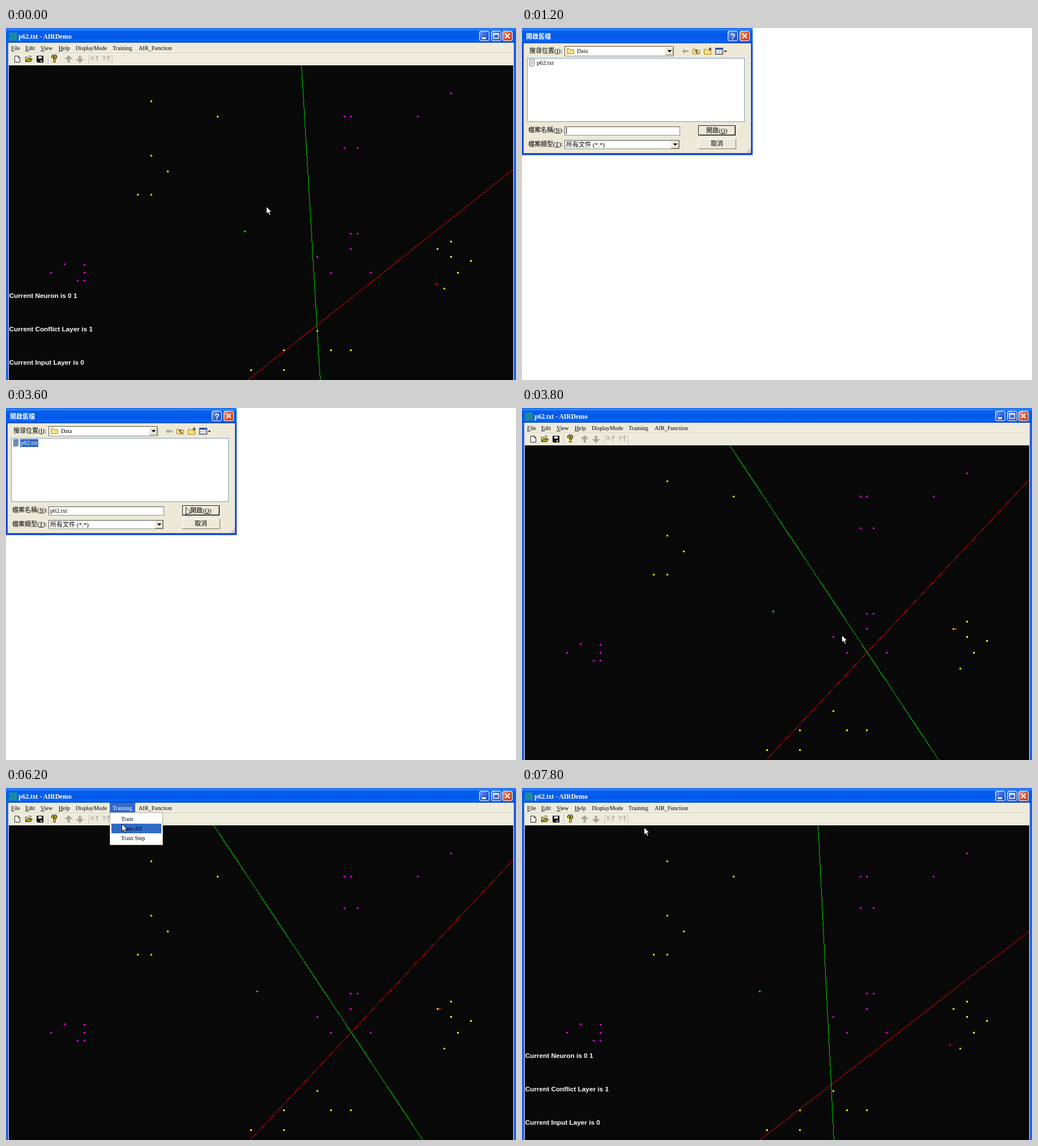
An HTML page that plays this animation: 900 by 622 pixels, repeating every 8000 ms.

```html
<!DOCTYPE html>
<html lang="zh-Hant">
<head>
<meta charset="utf-8">
<title>AIRDemo</title>
<style>
  html, body { margin: 0; width: 100%; height: 100%; overflow: hidden; background: #fff; }
  svg { display: block; }
  text { white-space: pre; }
  .menu { font: 10.2px "Liberation Serif", serif; }
  .file { font: 10.7px "Liberation Serif", serif; }
  .cjk { font: 11px "Liberation Serif", "Noto Sans CJK TC", "Noto Sans CJK", sans-serif; }
  .title { font: bold 11.6px "Liberation Serif", "Noto Sans CJK TC", "Noto Sans CJK", serif; fill: #fff; }
  .status { font: bold 11.8px "Liberation Sans", sans-serif; fill: #fff; }
  .u { text-decoration: underline; }
  .crisp { shape-rendering: crispEdges; }
  .field { fill: #fff; stroke: #8c8b80; }
</style>
</head>
<body>
<svg width="900" height="622" viewBox="0 0 900 622">
  <defs>
    <linearGradient id="bar" x2="0" y2="1">
      <stop offset="0" stop-color="#0a4fd0"/>
      <stop offset=".08" stop-color="#3d92ff"/>
      <stop offset=".2" stop-color="#0660ee"/>
      <stop offset=".6" stop-color="#0257e6"/>
      <stop offset=".88" stop-color="#0566fa"/>
      <stop offset="1" stop-color="#0343bd"/>
    </linearGradient>
    <linearGradient id="blue" x2="1" y2="1">
      <stop offset="0" stop-color="#7ba4f5"/>
      <stop offset=".5" stop-color="#3268e0"/>
      <stop offset="1" stop-color="#1c4cc4"/>
    </linearGradient>
    <linearGradient id="red" x2="1" y2="1">
      <stop offset="0" stop-color="#f3a186"/>
      <stop offset=".5" stop-color="#e2542d"/>
      <stop offset="1" stop-color="#c23c12"/>
    </linearGradient>
    <g id="close">
      <rect x=".5" y=".5" width="17" height="17" rx="2.5" fill="url(#red)" stroke="#fff"/>
      <path d="M5 5l8 8M13 5l-8 8" stroke="#fff" stroke-width="2"/>
    </g>
    <rect id="box" x=".5" y=".5" width="17" height="17" rx="2.5" fill="url(#blue)" stroke="#fff"/>
    <g id="drop" class="crisp">
      <rect width="14" height="14" fill="#ece9d8"/>
      <path d="M0 13.5h13.5V0" fill="none" stroke="#77756a"/>
      <path d="M3 5h8l-4 4z" fill="#000"/>
    </g>
    <path id="folder" d="M.5 10.5v-9h4l1.500 2h6.500v7z" fill="#ffe47c" stroke="#a87e1c"/>
  </defs>

  <g id="app">
    <rect width="900" height="622" fill="#1f60e6"/>
    <rect width="900" height="26" fill="url(#bar)"/>
    <rect x="5" y="8" width="14" height="14" fill="#1a8c96"/>
    <text class="title" x="22" y="19">p62.txt - AIRDemo</text>
    <use href="#box" x="835" y="5"/>
    <path d="M840 18h7" stroke="#fff" stroke-width="3"/>
    <use href="#box" x="856" y="5"/>
    <path d="M860.500 10h9v8.500h-9zM860 11h10" fill="none" stroke="#fff" stroke-width="1.500"/>
    <use href="#close" x="876" y="5"/>

    <rect x="4" y="26" width="892" height="596" fill="#eeebdc"/>
    <g class="crisp" fill="none">
      <path d="M5 44.500h890" stroke="#cbc7b8"/>
      <path d="M74.500 47v17M146.500 47v17M187.500 46v19" stroke="#b9b5a5"/>
      <path d="M5 45.500h890M75.500 47v17M147.500 47v17M188.500 46v19" stroke="#fff"/>
    </g>
    <rect id="hot" x="183" y="26" width="45" height="17" fill="#316ac5"/>
    <g class="menu">
      <text x="9" y="39"><tspan class="u">F</tspan>ile</text>
      <text x="34" y="39"><tspan class="u">E</tspan>dit</text>
      <text x="61" y="39"><tspan class="u">V</tspan>iew</text>
      <text x="93" y="39"><tspan class="u">H</tspan>elp</text>
      <text x="123" y="39">DisplayMode</text>
      <text id="training" x="188" y="39">Training</text>
      <text x="234" y="39">AIR_Function</text>
    </g>

    <path d="M15.500 49.500h6l3 3v8h-9zM21.500 49.500v3h3" fill="#fff" stroke="#222"/>
    <path d="M34.500 59.500v-8h3l1 1.500h5v2M40 50q3-2 5 1" fill="#fff48a" stroke="#222"/>
    <path d="M34.500 59.500l3-4.500h9l-3 4.500z" fill="#b8a414" stroke="#222"/>
    <path d="M54.500 49.500h11v11h-10l-1-1z" fill="#1c1c10" stroke="#000"/>
    <path d="M57 50h6v4h-6zM61 57h2v3h-2z" fill="#eee"/>
    <path d="M82 53v-2q0-2 3-2t3 2q0 2-2.500 3v3M85.500 58v3" fill="none" stroke="#000" stroke-width="4"/>
    <path d="M82 53v-2q0-2 3-2t3 2q0 2-2.500 3v3M85.500 58v3" fill="none" stroke="#e8d000" stroke-width="1.800"/>
    <path d="M110.500 48l7 7h-5v6h-4v-6h-5zM130.500 62l7-7h-5v-6h-4v6h-5z" fill="#aaa79a"/>
    <path d="M149 49l6 8M155 49l-6 8M156 53.500h3M161 59v-9M159 52l2-3 2 3M170 49l3 4 3-4M173 53v5M176 53.500h3M181 59v-9M179 52l2-3 2 3" fill="none" stroke="#aaa79a" stroke-width="1.200"/>

    <rect x="5" y="66" width="890" height="556" fill="#080808"/>
    <g id="dots" class="crisp"></g>
    <g class="crisp" fill="none">
      <path id="red-line" stroke="#c80000"/>
      <path id="green-line" stroke="#00d000"/>
      <rect id="red-dot" width="3" height="3" fill="#f00"/>
      <rect id="green-dot" width="3" height="3" fill="#00f000"/>
    </g>
    <g id="status" class="status">
      <text x="5.500" y="477">Current Neuron is 0 1</text>
      <text x="5.500" y="536">Current Conflict Layer is 1</text>
      <text x="5.500" y="595">Current Input Layer is 0</text>
    </g>
    <g id="popup" class="menu">
      <rect class="crisp" x="183.500" y="43.500" width="93" height="57" fill="#fff" stroke="#aca899"/>
      <rect id="row" x="186" width="88" height="17" fill="#316ac5"/>
      <text x="203" y="58">Train</text>
      <text x="203" y="75">Train All</text>
      <text x="203" y="92">Train Step</text>
    </g>
  </g>

  <g id="dialog">
    <rect width="900" height="622" fill="#fff"/>
    <rect width="407" height="224.500" fill="#0831d9"/>
    <rect x="1" width="405" height="223" fill="#0a55e4"/>
    <rect width="407" height="27" fill="url(#bar)"/>
    <rect x="3" y="27" width="401" height="194" fill="#ece9d8"/>
    <text class="title" x="7" y="19" style="font-size:11px">開啟舊檔</text>
    <use href="#box" x="363" y="5"/>
    <text x="368" y="19.500" fill="#fff" style="font:bold 14px 'Liberation Sans',sans-serif">?</text>
    <use href="#close" x="384" y="5"/>

    <g class="crisp">
      <rect class="field" x="75.500" y="32.500" width="192" height="17"/>
      <rect x="9.500" y="53.500" width="383" height="112" fill="#fff" stroke="#7f9db9"/>
      <rect class="field" x="75.500" y="174.500" width="203" height="15"/>
      <rect class="field" x="75.500" y="198.500" width="202" height="15"/>
      <path d="M75.500 49V32.500h191M75.500 189v-14.500h203M75.500 213v-14.500h202" fill="none" stroke="#55544c"/>
      <rect x="311.500" y="172.500" width="65" height="17" fill="#ece9d8" stroke="#111"/>
      <path d="M313 188.500h62.500V174M311 213.500h66.500V196" fill="none" stroke="#77756a"/>
      <path d="M312.500 188v-14.500h62M311.500 213v-17.500h65" fill="none" stroke="#fff"/>
    </g>
    <use href="#drop" x="253" y="34"/>
    <use href="#drop" x="263" y="199"/>
    <use href="#folder" x="79" y="35"/>

    <path d="M282 41l5-4.500v3h7v3h-7v3z" fill="#aaa798"/>
    <use href="#folder" x="301" y="35.500"/>
    <path d="M305 41l2.500-2.500L310 41M307.500 39v5h4" fill="none" stroke="#111"/>
    <use href="#folder" x="321" y="36"/>
    <path d="M332 34v6M329 37h6M330 35l4 4M334 35l-4 4" stroke="#222" stroke-width=".8"/>
    <rect x="341.500" y="35.500" width="13" height="11" fill="#fff" stroke="#223"/>
    <path d="M341 37h14" stroke="#2c55c8" stroke-width="3"/>
    <path d="M343 41.500h10M343 44.500h10" stroke="#333" stroke-dasharray="2 2"/>
    <path d="M356.500 40h5l-2.500 3z"/>

    <g class="cjk">
      <text x="13" y="44">搜尋位置(<tspan class="u">I</tspan>):</text>
      <text x="11" y="184">檔案名稱(<tspan class="u">N</tspan>):</text>
      <text x="11" y="209">檔案類型(<tspan class="u">T</tspan>):</text>
      <text x="78" y="209.500">所有文件 (*.*)</text>
      <text x="325" y="185">開啟(<tspan class="u">O</tspan>)</text>
      <text x="333" y="208">取消</text>
    </g>
    <text class="menu" x="97" y="44">Data</text>
    <path id="doc" d="M13.500 55.500h8v10l-2 2h-6z" stroke="#777"/>
    <path d="M15.500 59h4M15.500 61.500h4M15.500 64h3" stroke="#889"/>
    <rect id="pick" x="25" y="55" width="32" height="14" fill="#316ac5"/>
    <text id="entry" class="file" x="26" y="65">p62.txt</text>
    <text id="name" class="file" x="78" y="185">p62.txt</text>
    <path id="caret" class="crisp" d="M78.500 176v11" stroke="#000"/>
    <path d="M396 221l8-8M399 221l5-5M402 221l2-2" stroke="#a09d8c"/>
  </g>

  <path id="cursor" d="M.5 .5v13l3-2.700 2.300 5 2.200-1-2.200-4.800h4z" fill="#fff" stroke="#000" stroke-width=".9"/>
</svg>
<script>
const STEP = 200, TICKS = 40;
const OPEN = 6, PICK = 13, LOAD = 19, MENU = 30, TRAIN = 34;
const $ = id => document.getElementById(id);
const show = (id, on) => { $(id).style.display = on ? '' : 'none'; };
const set = (id, attrs) => { for (const k in attrs) $(id).setAttribute(k, attrs[k]); };
const mix = (a, b, p) => a.map((v, i) => v + (b[i] - v) * p);

const samples = {
  '#f4f400': '256,129 373,156 256,225 285,253 232,294 256,294 785,377 761,390 785,404 820,411 797,432 773,460 549,535 490,569 573,569 608,569 432,604 490,604',
  '#e000e0': '785,115 597,156 608,156 726,156 597,212 620,212 608,363 620,363 608,390 549,404 573,432 643,432 103,417 138,418 79,432 138,432 126,446 138,446'
};
for (const color in samples) {
  const d = samples[color].split(' ').map(p => `M${p}m-1-1h3v3h-3z`).join('');
  $('dots').insertAdjacentHTML('beforeend', `<path fill="${color}" d="${d}"/>`);
}

// green top x, green bottom x, red right y, red bottom x, green dot x, red dot x, red dot y
const trained = [521, 554, 250, 427, 421, 759, 452];
const loaded = [366, 735, 127, 431, 443, 765, 390];
const first = [377, 737, 218, 337, 450, 711, 435];
const last = [522, 550, 253, 420, 419, 755, 453];

// tick, x, y
const route = [
  [0, 459, 315], [5, 36, 50], [7, 391, 6], [12, 27, 58], [PICK, 27, 58],
  [18, 317, 175], [LOAD, 564, 401], [20, 564, 401], [26, 200, 110],
  [28, 170, 62], [MENU, 196, 32], [32, 211, 94], [TRAIN, 211, 94], [39, 215, 69]
];

function cursorAt(tick) {
  const i = Math.max(1, route.findIndex(k => k[0] >= tick));
  const a = route[i - 1], b = route[i];
  return mix(a, b, (tick - a[0]) / (b[0] - a[0])).slice(1).map(Math.round);
}

// training converges quickly, then settles
function poseAt(tick) {
  if (tick < LOAD) return trained;
  if (tick < TRAIN) return loaded;
  const p = (tick - TRAIN) / (TICKS - 1 - TRAIN);
  return mix(first, last, 1 - (1 - p) ** 3);
}

function draw(tick) {
  const dialog = tick >= OPEN && tick < LOAD;
  const picked = tick >= PICK;
  const menu = tick >= MENU && tick < TRAIN;
  const [x, y] = cursorAt(tick);
  const [gt, gb, rr, rb, gd, rx, ry] = poseAt(tick).map(Math.round);

  show('app', !dialog);
  show('dialog', dialog);
  show('status', tick < OPEN || tick >= TRAIN);
  show('cursor', tick !== OPEN);
  set('cursor', { transform: `translate(${x} ${y})` });

  set('green-line', { d: `M${gt + .5} 66L${gb + .5} 622` });
  set('red-line', { d: `M895 ${rr}L${rb} 622` });
  set('green-dot', { x: gd - 1, y: 358 });
  set('red-dot', { x: rx - 1, y: ry - 1 });

  show('hot', menu);
  show('popup', menu);
  show('row', y >= 46);
  set('row', { y: 46 + 17 * Math.floor((y - 46) / 17) });
  set('training', { fill: menu ? '#fff' : '#000' });

  show('pick', picked);
  show('name', picked);
  show('caret', !picked && !(tick >= 8 && tick < 10));
  set('entry', { fill: picked ? '#fff' : '#000' });
  set('doc', { fill: picked ? '#5f8bd0' : '#f4f4ee' });
}

let shown = -1;
function frame() {
  const tick = Math.floor(performance.now() / STEP) % TICKS;
  if (tick !== shown) draw(shown = tick);
  requestAnimationFrame(frame);
}
frame();
</script>
</body>
</html>
```
